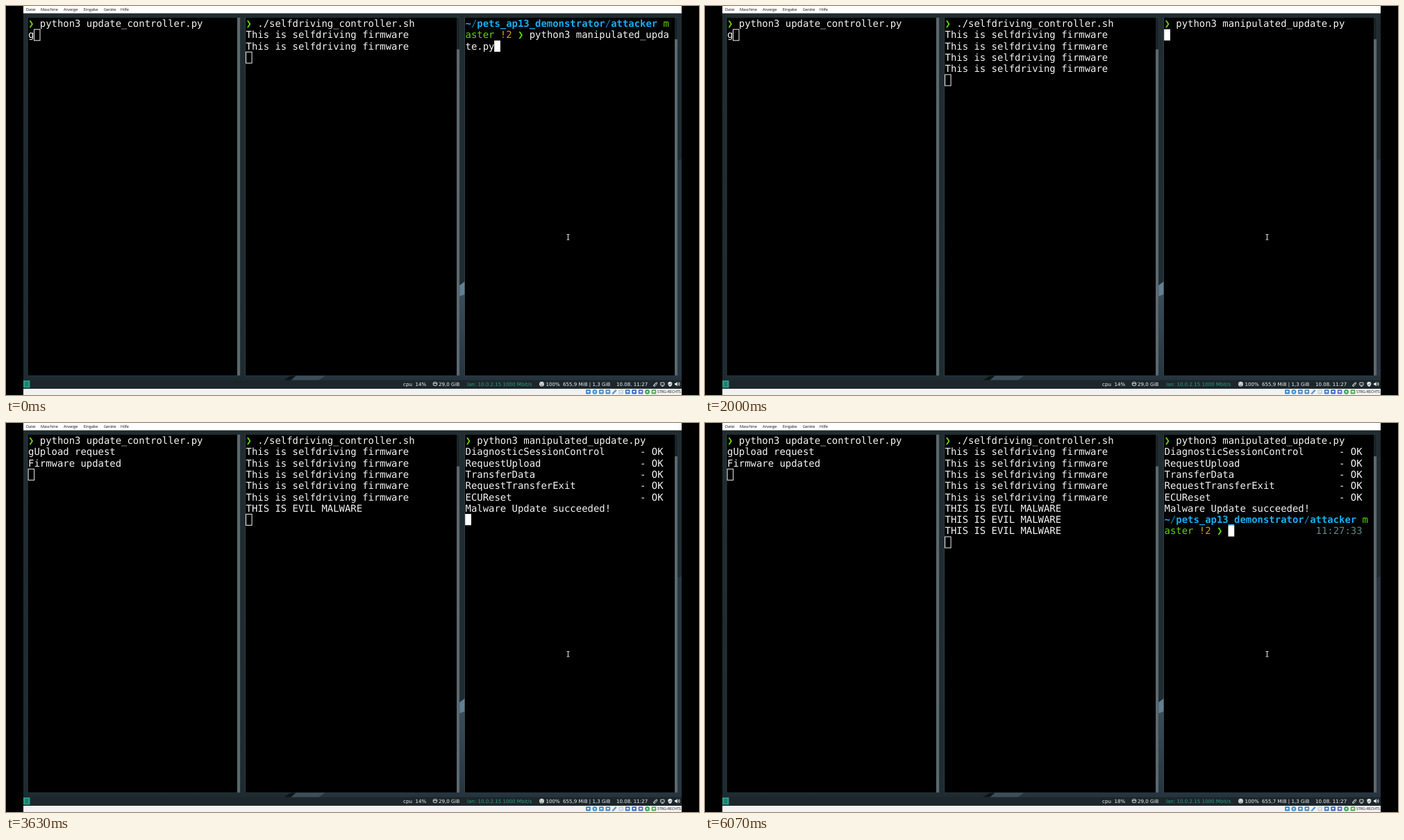
Write an HTML page that moves like this. It is 998x561 px and loops after 6160 ms.

```html
<!DOCTYPE html>
<html lang="de">
<head>
<meta charset="utf-8">
<title>Terminals</title>
<style>
html, body { margin: 0; width: 100%; height: 100%; overflow: hidden; background: #000; }
svg { display: block; width: 998px; height: 561px; }
text { text-rendering: geometricPrecision; white-space: pre; }
.term text { font: 13.93px "DejaVu Sans Mono", monospace; fill: #f4f4f4; }
.term .ok { fill: #5fd700; }
.term .path { fill: #14aff5; font-weight: bold; }
.term .sep { fill: #0e87b4; }
.term .dirty { fill: #d7a010; }
.term .clock { fill: #5f8787; }
.box { fill: none; stroke: #eee; }
.block { fill: #fff; }
.menu text { font: 5.6px "Open Sans", sans-serif; fill: #111; }
.bar text { font: 7.1px "DejaVu Sans", sans-serif; fill: #f0f0f0; }
.bar .net { fill: #2b9a85; }
.bar .icon { fill: none; stroke: #e6e6e6; stroke-width: .9; }
.bar .solid { fill: #e6e6e6; }
</style>
</head>
<body>
<svg viewBox="0 0 998 561">
  <defs>
    <linearGradient id="wall" x1="0" y1="0" x2="0" y2="1">
      <stop offset="0" stop-color="#202c30"/>
      <stop offset="1" stop-color="#1e2b31"/>
    </linearGradient>
    <linearGradient id="blue" x1="0" y1="0" x2="0" y2="1">
      <stop offset="0" stop-color="#3a4c5a"/>
      <stop offset="1" stop-color="#26333f"/>
    </linearGradient>
  </defs>
  <rect width="998" height="561"/>
  <rect x="25" y="10" width="948" height="543" fill="url(#wall)"/>
  <!-- wallpaper showing between the windows -->
  <path d="M653 403L661 397V416L653 419Z" fill="#617f92"/>
  <path d="M653 419L661 416V540H653Z" fill="url(#blue)"/>
  <path d="M966 223L973 221V540H966Z" fill="#2a3742"/>
  <path d="M455 533H973V540H448Z" fill="#26343f"/>
  <path d="M400 540L410 533H418L410 540Z" fill="#0d1519"/>
  <path d="M410 540L418 533H460L450 540Z" fill="#3c4e59"/>

  <g class="menu">
    <rect x="25" width="948" height="10.5" fill="#fdfdfd"/>
    <text x="29" y="7.4">Datei</text>
    <text x="50" y="7.4">Maschine</text>
    <text x="83" y="7.4">Anzeige</text>
    <text x="111.7" y="7.4">Eingabe</text>
    <text x="140.7" y="7.4">Geräte</text>
    <text x="165" y="7.4">Hilfe</text>
  </g>

  <g id="term" class="term"></g>

  <path d="M807.5 329.5H811.5M809.5 329.5V337M807.5 337H811.5" fill="none" stroke="#ccc" stroke-width="1.2"/>

  <g class="bar">
    <rect x="25" y="539.5" width="948" height="12.5" fill="#1d272b"/>
    <rect x="25" y="540" width="9.5" height="10.5" fill="#2a9a85"/>
    <path d="M27.5 543H32M27.5 545.3H32M27.5 547.6H32" stroke="#15534a" stroke-width=".9"/>
    <text x="572" y="548">cpu</text>
    <text id="cpu" x="589.6" y="548">14%</text>
    <g class="icon">
      <ellipse cx="618" cy="543.6" rx="2.7" ry="1.1"/>
      <path d="M615.3 543.6V546.8Q618 548.6 620.7 546.8V543.6"/>
    </g>
    <text x="623" y="548">29,0 GiB</text>
    <text class="net" x="664" y="548">lan: 10.0.2.15 1000 Mbit/s</text>
    <circle class="solid" cx="771.5" cy="545.2" r="3.4"/>
    <path d="M770 543.4V544.6M773 543.4V544.6M769.6 546.3Q771.5 548 773.4 546.3" fill="none" stroke="#1d272b" stroke-width=".8"/>
    <text x="777.5" y="548">100%</text>
    <text id="mem" x="802" y="548">655,9 MiB | 1,3 GiB</text>
    <text x="879" y="548">10.08. 11:27</text>
    <g class="icon">
      <path d="M932.5 548L936.3 543Q938.3 542.5 937.3 545L934.5 548.3Q932.6 549 932.5 547.2L935.6 543.8"/>
      <path d="M942.8 543.2H948V547H942.8ZM944 548.4H946.8"/>
    </g>
    <path class="solid" d="M956.3 541.8L959.2 543V545.5Q958.8 548 956.3 549Q953.8 548 953.4 545.5V543Z"/>
    <path d="M954.8 545.3L956 546.5L958 544.2" fill="none" stroke="#1d272b" stroke-width=".8"/>
    <path class="solid" d="M963 544H964.6L966.8 542V548.4L964.6 546.4H963Z"/>
    <path class="icon" d="M968 543.6Q969.2 545.2 968 546.8M969.3 542.5Q971 545.2 969.3 547.9"/>
  </g>

  <g class="menu">
    <rect x="25" y="552" width="948" height="9" fill="#f2f2f2"/>
    <g id="tray"></g>
    <text x="938" y="558.4" style="font-size:5.3px">STRG-RECHTS</text>
  </g>
</svg>
<script>
const LOOP = 6160, CW = 8.386, LH = 16.28, TOP = 17.2;
const NS = 'http://www.w3.org/2000/svg';
const byId = id => document.getElementById(id);
const term = byId('term');

function add(parent, tag, attrs, text) {
  const el = document.createElementNS(NS, tag);
  for (const k in attrs) el.setAttribute(k, attrs[k]);
  if (text) el.textContent = text;
  parent.append(el);
  return el;
}
const rect = (x, y, w, h, fill) => add(term, 'rect', { x, y, width: w, height: h, fill });

// window: left edge, text start, scrollbar x, scrollbar top
const panes = [[31.5, 32, 333, 17], [345, 345.5, 649, 62.5], [661, 661.5, 963, 48]];
for (const [left, , bar, barTop] of panes) {
  rect(left - .7, 16, bar - left + 5, 517.3, '#3a474c');
  rect(left, 16.6, bar - left, 516.2, '#000');
  rect(bar, 16.6, 4, 516.2, '#1a2428');
  rect(bar, barTop, 4, 532.8 - barTop, '#5b686e');
}

const timed = [];
function put(pane, row, col, text, from = 0, to = LOOP, cls = '') {
  const x = panes[pane][1] + col * CW, y = TOP + row * LH + 12.9;
  timed.push({ el: add(term, 'text', { x, y, class: cls }, text), from, to });
}
function command(pane, text, from) {
  put(pane, 0, 0, '❯', from, LOOP, 'ok');
  put(pane, 0, 2, text, from);
}
function prompt(row, from, to) {
  const part = (r, col, text, cls) => put(2, r, col, text, from, to, cls);
  part(row, 0, '~', 'path');
  part(row, 1, '/', 'sep');
  part(row, 2, 'pets_ap13_demonstrator', 'path');
  part(row, 24, '/', 'sep');
  part(row, 25, 'attacker', 'path');
  part(row, 34, 'm', 'ok');
  part(row + 1, 0, 'aster', 'ok');
  part(row + 1, 6, '!2', 'dirty');
  part(row + 1, 9, '❯', 'ok');
}

command(0, 'python3 update_controller.py', 0);
put(0, 1, 0, 'g');
put(0, 1, 1, 'Upload request', 2370);
put(0, 2, 0, 'Firmware updated', 2670);

command(1, './selfdriving_controller.sh', 0);
const beats = [0, 0, 300, 1300, 2330, 3330, 4330, 5370];
beats.forEach((t, i) =>
  put(1, i + 1, 0, i < 5 ? 'This is selfdriving firmware' : 'THIS IS EVIL MALWARE', t));

prompt(0, 0, 1600);
put(2, 1, 11, 'python3 manipulated_upda', 0, 1600);
put(2, 2, 0, 'te.py', 0, 1600);
command(2, 'python3 manipulated_update.py', 1600);
const steps = [['DiagnosticSessionControl', 2370], ['RequestUpload', 2670], ['TransferData', 3000],
  ['RequestTransferExit', 3310], ['ECUReset', 3630]];
steps.forEach(([name, t], i) => {
  put(2, i + 1, 0, name, t);
  put(2, i + 1, 30, '- OK', t);
});
put(2, 6, 0, 'Malware Update succeeded!', 3630);
prompt(7, 3800, LOOP);
put(2, 8, 26, '11:27:33', 3800, LOOP, 'clock');

// cursor stops: time, row, column
const stops = [
  [[0, 1, 1], [2370, 2, 0], [2670, 3, 0]],
  beats.slice(1).map((t, i) => [t, i + 3, 0]),
  [[0, 2, 5], [1600, 1, 0], ...steps.map(([, t], i) => [t, i + 2, 0]), [3630, 7, 0], [3800, 8, 11]]
];
const cursors = stops.map((_, i) => {
  const solid = i === 2;
  return add(term, 'rect', {
    class: solid ? 'block' : 'box',
    width: solid ? 8.8 : 8.5, height: solid ? 16.2 : 16
  });
});

// machine status icons
const tints = ['#2f7fd0', '#3a9ad8', '#3f88c8', '#4c86b8', '#5a9bd0', '#c9d3dc', '#3a78c0', '#2f66c8', '#5865d0', '#3fa558', '#4bb04b'];
tints.forEach((c, i) => {
  const x = 838.5 + i * 9.45, tray = byId('tray');
  if (i === 1 || i === 9) {
    add(tray, 'circle', { cx: x, cy: 556.4, r: 3.4, fill: c });
    add(tray, 'circle', { cx: x, cy: 556.4, r: 1.2, fill: '#e8f2fa' });
  } else if (i === 4) {
    add(tray, 'path', { d: `M${x - 3} 559.5L${x + .5} 556M${x - .5} 556.8L${x + 2.5} 553.8`, stroke: c, 'stroke-width': 2.4 });
  } else {
    add(tray, 'rect', { x: x - 3.3, y: 553.2, width: 6.6, height: 6.4, rx: .8, fill: c });
    add(tray, 'rect', { x: x - 1.6, y: 555, width: 3.2, height: 2.4, fill: '#e8f2fa' });
  }
});

function draw(now) {
  const t = now % LOOP;
  for (const { el, from, to } of timed)
    el.style.display = t >= from && t < to ? '' : 'none';
  stops.forEach((list, i) => {
    const [, row, col] = list.filter(s => s[0] <= t).pop();
    cursors[i].setAttribute('x', panes[i][1] + col * CW + (i < 2 ? .1 : -.3));
    cursors[i].setAttribute('y', TOP + row * LH + (i < 2 ? .3 : 0));
  });
  const late = t >= 6000;
  byId('cpu').textContent = late ? '18%' : '14%';
  byId('mem').textContent = late ? '655,7 MiB | 1,3 GiB' : '655,9 MiB | 1,3 GiB';
}
const start = performance.now();
function tick() {
  draw(performance.now() - start);
  requestAnimationFrame(tick);
}
tick();
</script>
</body>
</html>
```
